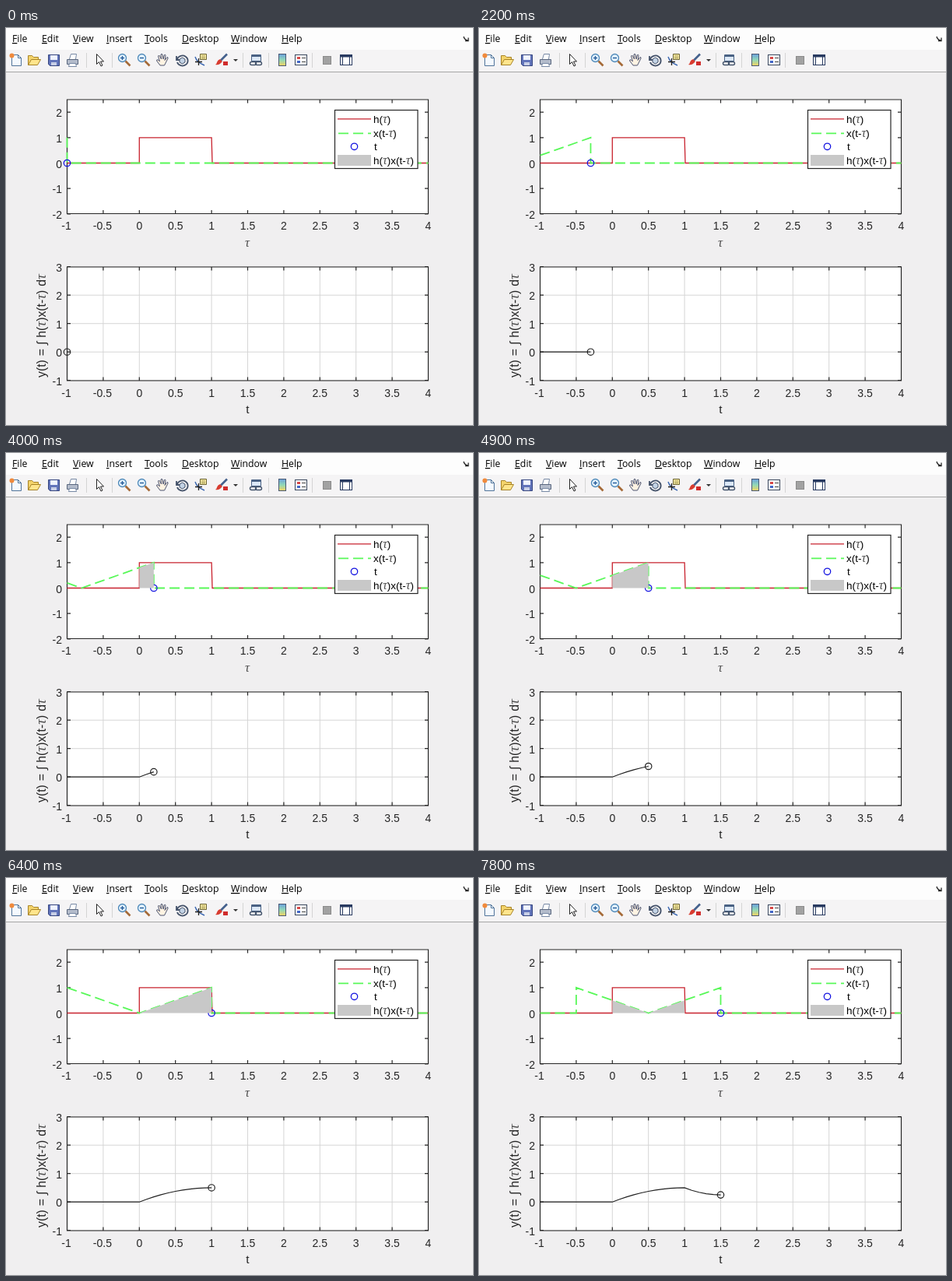
Recreate the animation shown at these times as an HTML page. Size 600 px wide and 510 px high, loop 8 s.

```html
<!DOCTYPE html>
<html>
<head>
<meta charset="utf-8">
<style>
  html, body { margin: 0; width: 600px; height: 510px; overflow: hidden; }
  svg { display: block; font: 14px "Liberation Sans", Arial, sans-serif; fill: none; }
  text { fill: #262626; white-space: pre; }
  .menu text { font: 12.3px "Open Sans", sans-serif; fill: #000; }
  .key { text-decoration: underline; }
  .tau { font: italic 1.2em "Liberation Serif", serif; fill: #505050; }
  .legend text { font-size: 13.5px; fill: #000; }
  .frame { stroke: #262626; stroke-width: 1.2; }
  .grid { stroke: #d6d6d6; }
  .h { stroke: #c8222e; stroke-width: 1.3; }
  .x { stroke: #58f858; stroke-width: 1.8; stroke-dasharray: 13 6; }
  .now { stroke: #1414e0; stroke-width: 1.3; }
  .y { stroke: #222; stroke-width: 1.2; }
  .area { fill: #c8c8c8; }
</style>
</head>
<body>
<svg width="600" height="510">
  <rect width="600" height="510" fill="#f0eff0"/>
  <rect width="600" height="28" fill="#fdfdfd"/>
  <rect y="28" width="600" height="28" fill="#f5f4f5"/>
  <path d="M0 56.5H600" stroke="#a6a6a6"/>
  <g class="menu" id="menu"></g>
  <path d="M588 11q1 4 5 5M594 12.500v4h-4" stroke="#222" stroke-width="1.300"/>

  <g id="icons">
    <path d="M103.500 32v19M136.500 32v19M304.500 32v19M337.500 32v19M393.500 32v19" stroke="#d4d4d4"/>
    <path d="M7.500 34.500h8l4 4v10h-12z" fill="#f4f9ff" stroke="#50749a"/>
    <path d="M15.500 34.500v4h4" stroke="#50749a"/>
    <circle cx="7.500" cy="35.500" r="3" fill="#f08a3c"/>
    <path d="M28.500 47.500v-12h5l2 2h6v3" fill="#f3d36b" stroke="#a88428"/>
    <path d="M28.500 47.500l4-7h12l-4 7z" fill="#ffe58c" stroke="#a88428"/>
    <path d="M54.500 34.500h14v14h-12l-2-2z" fill="#6274ba" stroke="#35457f"/>
    <path d="M57 35h9v6h-9z" fill="#eef2ff"/>
    <path d="M58 44h7v4h-7z" fill="#c8cfe6"/>
    <path d="M81.500 40l2-6.500h7l-1 6.500" fill="#fff" stroke="#7688a4"/>
    <path d="M78.500 40.500h14v6h-14z" fill="#b4bccb" stroke="#59667e"/>
    <path d="M81.500 45.500h8l1 4h-10z" fill="#fff" stroke="#7688a4"/>
    <path d="M116.500 33.500v13l3-3 2.500 5.500 2-1-2.500-5h4z" fill="#fff" stroke="#222"/>
    <g id="zoom">
      <path d="M153.500 42.500l6 6" stroke="#a56a38" stroke-width="2.600"/>
      <circle cx="149.500" cy="38.500" r="5" fill="#e4f3ff" stroke="#4d88b8" stroke-width="1.300"/>
      <path d="M147 38.500h5" stroke="#245a98" stroke-width="1.400"/>
    </g>
    <use href="#zoom" x="25"/>
    <path d="M149.500 36v5" stroke="#245a98" stroke-width="1.400"/>
    <path d="M198 48l-4.500-6q0-2 2-1l2 2-2-7q1-2 2 0l2 4-.5-6q1-1.500 2 0l1 6 1.500-5.500q1.500-1 1.500 1l-1 6 3-4q1.500 0 1 1.500l-3 6-1.500 3z" fill="#fff3e2" stroke="#4c5470"/>
    <path d="M219 36v5h5M220 40a7 6.500 0 1 1 0 4" stroke="#44526a" stroke-width="1.800"/>
    <path d="M226.500 38l3.500 2v4l-3.500 2-3.500-2v-4z" fill="#c3d3e5" stroke="#44526a"/>
    <path d="M249.500 33.500h8v7h-8z" fill="#fff0a8" stroke="#686030"/>
    <path d="M251 36h5M251 38.500h5" stroke="#8a8040"/>
    <path d="M243 37q2 7 12 11" stroke="#3a66b0" stroke-width="1.400"/>
    <path d="M247.500 39v9M243 43.500h9" stroke="#222" stroke-width="1.300"/>
    <path d="M284 33.500l-8 8" stroke="#44608c" stroke-width="2.600"/>
    <path d="M275 40l3 3-3 3q-3 2-6 1 2-1 2-3 1-3 4-4z" fill="#d83c30"/>
    <path d="M279 43h6v5h-6z" fill="#d02c2c"/>
    <path d="M292 40h6l-3 3z" fill="#333"/>
    <path d="M315.500 34.500h12v8h-12z" fill="#dce8f6" stroke="#4a6284"/>
    <path d="M316 36h11" stroke="#4a6284" stroke-width="2"/>
    <rect x="313.500" y="43.500" width="8" height="4" rx="2" stroke="#44546c" stroke-width="1.400"/>
    <rect x="320.500" y="43.500" width="8" height="4" rx="2" stroke="#44546c" stroke-width="1.400"/>
    <linearGradient id="bar" x2="0" y2="1">
      <stop stop-color="#6ca0dc"/><stop offset=".5" stop-color="#90d8b8"/><stop offset="1" stop-color="#f4d460"/>
    </linearGradient>
    <rect x="350.500" y="33.500" width="9" height="15" fill="url(#bar)" stroke="#4a5a74"/>
    <rect x="371.500" y="34.500" width="15" height="13" fill="#fff" stroke="#38465c"/>
    <path d="M374 37h4v3h-4z" fill="#d84848"/>
    <path d="M374 42h4v3h-4z" fill="#4468c8"/>
    <path d="M380 38.500h5M380 43.500h5" stroke="#444"/>
    <rect x="407.500" y="36.500" width="10" height="10" fill="#a2a2a2" stroke="#8a8a8a"/>
    <rect x="429.500" y="34.500" width="15" height="13" fill="#fff" stroke="#283a60"/>
    <path d="M429 36h16" stroke="#283a60" stroke-width="3"/>
    <path d="M432.500 37v10M441.500 37v10" stroke="#283a60"/>
  </g>

  <rect x="78.500" y="92" width="464" height="146.500" fill="#fff"/>
  <rect x="78.500" y="307" width="464" height="146" fill="#fff"/>
  <g id="axes"></g>
  <path class="h" id="h"/>
  <path class="x" id="x"/>
  <circle class="now" id="now" r="4.200"/>
  <path class="area" id="area"/>
  <path class="y" id="y"/>
  <circle class="y" id="tip" r="4.200"/>

  <text class="tau" x="310" y="281" text-anchor="middle">τ</text>
  <text x="310.500" y="495" font-size="15.400" text-anchor="middle">t</text>
  <text transform="translate(51 449) rotate(-90)" font-size="15.800" word-spacing=".6">y(t) = ∫ h(<tspan class="tau">τ</tspan>)x(t-<tspan class="tau">τ</tspan>) d<tspan class="tau">τ</tspan></text>

  <g class="legend">
    <rect class="frame" x="422.500" y="105.500" width="106.500" height="75" fill="#fff"/>
    <path class="h" d="M426 116.800h43"/>
    <path class="x" d="M427 135.300h42"/>
    <circle class="now" cx="447.500" cy="152.300" r="4.200"/>
    <path class="area" d="M426 163h43v14h-43z"/>
    <text x="472" y="122">h(<tspan class="tau">τ</tspan>)</text>
    <text x="472" y="140">x(t-<tspan class="tau">τ</tspan>)</text>
    <text x="473" y="157">t</text>
    <text x="472" y="175">h(<tspan class="tau">τ</tspan>)x(t-<tspan class="tau">τ</tspan>)</text>
  </g>
</svg>
<script>
const $ = id => document.getElementById(id);
const px = v => 78.5 + (v + 1) * 92.8;
const topY = v => 173.5 - v * 32.7;
const lowY = v => 416.2 - v * 36.5;
const path = (points, toY) => 'M' + points.map(([a, b]) => px(a).toFixed(2) + ' ' + toY(b).toFixed(2)).join('L');

const menu = { File: 8, Edit: 46, View: 86, Insert: 129, Tools: 178, Desktop: 226, Window: 289, Help: 354 };
$('menu').innerHTML = Object.entries(menu).map(([name, x]) =>
  `<text x="${x}" y="18"><tspan class="key">${name[0]}</tspan>${name.slice(1)}</text>`).join('');

function axes(top, bottom, low, high, toY, grid) {
  let lines = '', ticks = '', labels = '';
  for (let v = -1; v <= 4; v += 0.5) {
    const x = px(v);
    lines += `M${x} ${top}V${bottom}`;
    ticks += `M${x} ${top}v4.500M${x} ${bottom}v-4.500`;
    labels += `<text x="${x - (v < 0 ? 1 : 0)}" y="259" dy="${bottom - 238.5}" text-anchor="middle">${v}</text>`;
  }
  for (let v = low; v <= high; v++) {
    const y = toY(v);
    lines += `M78.500 ${y}H542.500`;
    ticks += `M78.500 ${y}h4.500M542.500 ${y}h-4.500`;
    labels += `<text x="72" y="${y + 6}" text-anchor="end">${v}</text>`;
  }
  return (grid ? `<path class="grid" d="${lines}"/>` : '') +
    `<path class="frame" d="M78.500 ${top}H542.500V${bottom}H78.500z${ticks}"/>` + labels;
}
$('axes').innerHTML = axes(92, 238.5, -2, 2, topY) + axes(307, 453, -1, 3, lowY, true);
$('h').setAttribute('d', path([[-1, 0], [0, 0], [0, 1], [1, 1], [1.01, 0], [4, 0]], topY));

// x(u) = |1 - u| on [0, 2]; its running integral gives y(t)
const integral = u => u < 0 ? 0 : u < 1 ? u - u * u / 2 : u < 2 ? 0.5 + (u - 1) ** 2 / 2 : 1;
const conv = t => integral(t) - integral(t - 1);

function signal(t, from, to) {
  const points = [[from, Math.abs(1 - t + from)]];
  if (t - 1 > from && t - 1 < to) points.push([t - 1, 0]);
  points.push([to, Math.abs(1 - t + to)], [to, 0]);
  return points;
}

function draw(step) {
  const t = (step - 10) / 10;
  const start = Math.max(-1, t - 2);
  const lead = start > -1 ? [[-1, 0], [start, 0]] : [];
  $('x').setAttribute('d', path([...lead, ...signal(t, start, t), [4, 0]], topY));
  $('area').setAttribute('d', t > 0 ? path([[0, 0], ...signal(t, 0, Math.min(1, t))], topY) + 'z' : '');
  const curve = Array.from({ length: step + 1 }, (_, i) => [(i - 10) / 10, conv((i - 10) / 10)]);
  $('y').setAttribute('d', path(curve, lowY));
  for (const [id, y] of [['now', topY(0)], ['tip', lowY(conv(t))]]) {
    $(id).setAttribute('cx', px(t));
    $(id).setAttribute('cy', y);
  }
}

// times of the 0.1 steps of t, in tenths of a second
const stepTimes = [2, 5, 9, 12, 15, 18, 22, 25, 29, 32, 36, 39, 42, 46, 49, 52, 54, 57, 60, 63, 66, 69, 72, 75, 78];
function tick() {
  const now = performance.now() % 8000;
  draw(stepTimes.filter(s => s * 100 <= now).length);
  requestAnimationFrame(tick);
}
tick();
</script>
</body>
</html>
```
